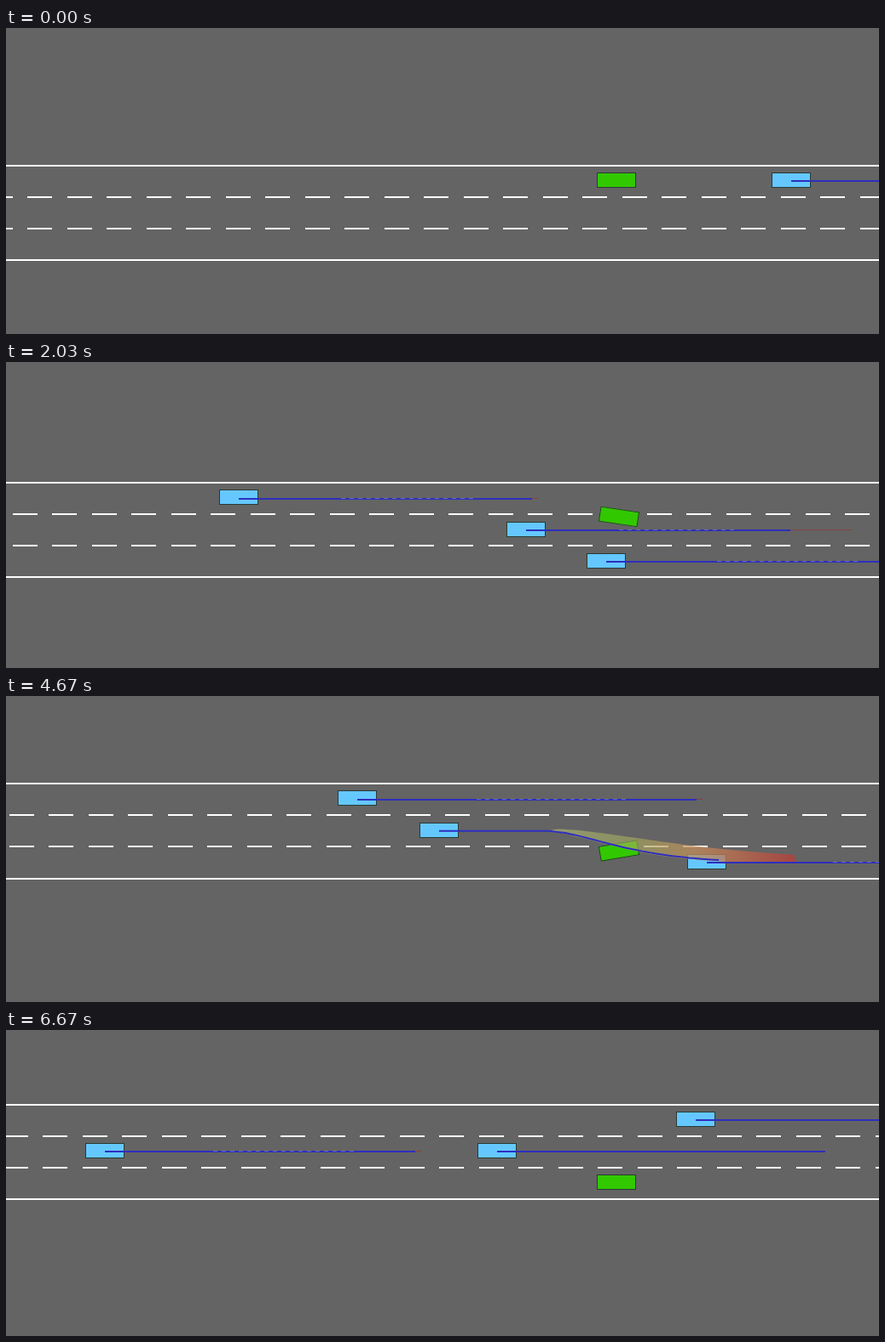
Write an HTML page with a canvas that moves like this. It is 1024x360 px and loops after 6710 ms.

```html
<!DOCTYPE html>
<html>
<head>
<meta charset="utf-8">
<style>
  html, body { margin: 0; width: 100%; height: 100%; overflow: hidden; background: #646464; }
  canvas { display: block; }
</style>
</head>
<body>
<canvas id="stage" width="1024" height="360"></canvas>
<script>
const ctx = document.getElementById('stage').getContext('2d');
const LOOP = 6710, LAST = 200, W = 1024, H = 360;
const LANE = 37.18, TOP = 161.9, DASH = 46.5;
const EGO_X = 716, EGO_Y = 179, EGO_PACE = 27.87, CAR_PACE = 18.3;
const BLUE = '#2e2ebe';

// One step of the lane keeping controller: position moves towards aim, drift lags behind.
function steer(s, aim) {
  const want = (aim - s.pos) / 5.88;
  return { pos: s.pos + 0.7 * s.drift + 0.3 * want, drift: (s.drift + want) / 2 };
}

// Ego lane choices: [step, lane]
const choices = [[0, 0], [3, 1], [16, 2], [32, 1], [41, 0], [56, 1], [69, 2],
  [136, 1], [153, 0], [154, 1], [160, 2]];
const ego = [{ pos: TOP, drift: 0 }];
for (let n = 0; n < LAST; n++) {
  const lane = choices.filter(c => c[0] <= n).pop()[1];
  ego.push(steer(ego[n], TOP - LANE * lane));
}

// Share of a lane change still to go after k steps
const shares = [{ pos: 1, drift: 0 }];
for (let k = 0; k < 80; k++) shares.push(steer(shares[k], 0));
function remaining(k) {
  if (k <= 0) return 1;
  const i = Math.min(79, Math.floor(k));
  return shares[i].pos + (shares[i + 1].pos - shares[i].pos) * Math.min(1, k - i);
}

// Pixels the ego car falls behind its steady pace: [step, lag, lag change per step]
const lag = [[0, 0, 0.4], [39, 15, 0], [61, 9, 0], [86, 21, 0], [140, 21, 0], [162, 12, 0]];

// path: [step, x, backward speed]; turn: step at which the car moves to lane `next`
const cars = [
  { lane: 0, tail: 70, path: [[0, 921, 9.4], [39, 536, 10.3], [61, 273, 11.8]] },
  { lane: 1, tail: 70, path: [[39, 843, 8.5], [61, 610, 13.5], [86, 246, 11.4]] },
  { lane: 2, tail: 70, path: [[39, 879, 6.4], [86, 398, 15]] },
  { lane: 0, path: [[162, 212, 9.1]] },
  { lane: 1, next: 2, turn: 147, path: [[86, 959, 8], [140, 508, 12.4], [162, 209, 11.65]] },
  { lane: 2, next: 1, turn: 174, path: [[140, 822, 7.8], [162, 650, 11.3], [200, 116, 10.8]] },
  { lane: 1, plain: true, path: [[200, 576, 9.76]] },
  { lane: 0, plain: true, path: [[200, 809, 9]] }
];

// Smooth curve through [step, value, slope] points, straight beyond both ends
function curve(points, n, sign) {
  const i = points.findIndex(p => p[0] > n);
  if (i < 1) {
    const [a, p, u] = points[i ? points.length - 1 : 0];
    return { value: p + sign * u * (n - a), slope: u };
  }
  const [a, p, u] = points[i - 1], [b, q, v] = points[i];
  const d = b - a, t = (n - a) / d, r = 1 - t, mix = t * t * (3 - 2 * t);
  return {
    value: p + (q - p) * mix + sign * d * t * r * (u * r - v * t),
    slope: u + (v - u) * t
  };
}

function box(x, y, angle, fill) {
  const slip = 17 * Math.abs(angle);
  ctx.save();
  ctx.translate(Math.round(x + slip), Math.round(y + slip));
  ctx.rotate(angle);
  ctx.fillStyle = fill;
  ctx.fillRect(-23, -9, 46, 18);
  ctx.strokeStyle = '#2a3a34';
  ctx.lineWidth = 1;
  ctx.strokeRect(-22.5, -8.5, 45, 17);
  ctx.restore();
}

function hline(x, y, w, h, fill) {
  ctx.fillStyle = fill;
  ctx.fillRect(Math.round(x), Math.round(y) - 1, w, h);
}

function road(n, top) {
  for (const i of [0, 3]) hline(0, top + i * LANE, W, 2, '#fff');
  const travelled = EGO_PACE * n - curve(lag, n, 1).value;
  const shift = ((25 - travelled) % DASH + DASH) % DASH;
  for (let x = shift - DASH; x < W; x += DASH)
    for (const i of [1, 2]) hline(x, top + i * LANE, 29, 2, '#fff');
}

function straightPath(car, x, y, len) {
  hline(x, y, len, 2, BLUE);
  if (car.plain) return;
  const tail = 7 + (car.tail || 0) * Math.exp(-(((x - 590) / 90) ** 2));
  hline(x + len, y, tail, 1, 'rgba(150,50,50,0.7)');
  for (let d = 0.35 * len; d < 0.8 * len; d += 10)
    hline(x + d, y, 5, 1, 'rgba(195,200,175,0.4)');
}

// Planned lane change with its fan of slower variants
function turnPath(car, n, x, top, len) {
  const dir = car.next - car.lane;
  const goal = top + LANE * (car.next + 0.5);
  const done = Math.max(0, n - car.turn);
  const start = x + Math.max(0, car.turn - n) * CAR_PACE;
  const end = x + len, far = end + 88;
  const yAt = (px, rate) =>
    goal - dir * LANE * remaining(done + rate * Math.max(0, px - start) / CAR_PACE);

  const tint = ctx.createLinearGradient(start, 0, far, 0);
  tint.addColorStop(0, 'rgba(165,170,120,0.75)');
  tint.addColorStop(0.3, 'rgba(165,175,95,0.6)');
  tint.addColorStop(0.6, 'rgba(195,140,90,0.75)');
  tint.addColorStop(1, 'rgba(180,60,55,0.8)');
  ctx.fillStyle = tint;
  ctx.beginPath();
  ctx.moveTo(start - 8, yAt(start, 1));
  for (let px = start; px <= far; px += 6)
    ctx.lineTo(px, yAt(px, 0.55) - dir * Math.min(3, (px - start) / 3));
  for (let px = far; px >= start; px -= 6)
    ctx.lineTo(px, yAt(px, 1) + dir * Math.min(1.5, (px - start) / 20));
  ctx.fill();

  ctx.strokeStyle = BLUE;
  ctx.lineWidth = 2;
  ctx.beginPath();
  ctx.moveTo(x, yAt(x, 1));
  for (let px = start; px <= end; px += 5) ctx.lineTo(px, yAt(px, 1));
  ctx.stroke();
}

function draw(n) {
  const { pos: top, drift } = ego[n];
  ctx.fillStyle = '#646464';
  ctx.fillRect(0, 0, W, H);
  road(n, top);

  const seen = cars.map(car => {
    const { value: x, slope } = curve(car.path, n, -1);
    let lane = car.lane, angle = 0;
    if (car.turn) {
      const k = n - car.turn, left = remaining(k), dir = car.next - car.lane;
      lane = car.next - dir * left;
      angle = dir * (left - remaining(k + 1)) * LANE / CAR_PACE;
    }
    return { car, x, y: top + LANE * (lane + 0.5), angle, len: Math.round(580 - 20 * slope) };
  }).filter(s => s.x > -30 && s.x < W + 30);

  for (const s of seen) box(s.x, s.y - 1.2, s.angle, '#64c8ff');
  box(EGO_X, EGO_Y, -drift / EGO_PACE, '#32c800');
  for (const { car, x, y, len } of seen) {
    if (x < 0) continue;
    const turning = car.turn && n >= car.turn - 12 && n < car.turn + 14;
    if (turning) turnPath(car, n, x, top, len);
    else straightPath(car, x, y, len);
  }
}

// Three steps every 100 ms, starting at 0, 30 and 70
function tick() {
  const ms = performance.now() % LOOP, r = ms % 100;
  draw(Math.min(LAST, Math.floor(ms / 100) * 3 + (r < 30 ? 0 : r < 70 ? 1 : 2)));
  requestAnimationFrame(tick);
}
tick();
</script>
</body>
</html>
```
